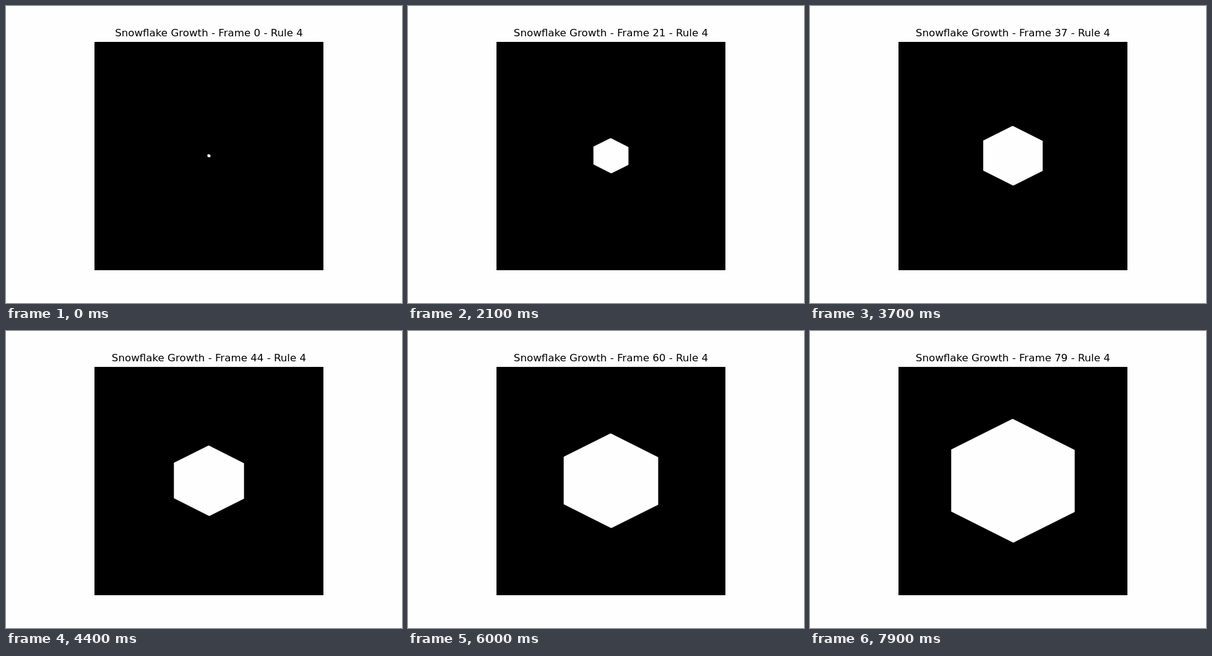
These frames come from a looping animation (640 px wide and 480 px high, 8 s). An HTML page with a canvas:

```html
<!DOCTYPE html>
<html lang="en">
<head>
<meta charset="utf-8">
<title>Snowflake Growth</title>
<style>
  html, body { margin: 0; width: 100%; height: 100%; overflow: hidden; background: #fefefe; }
  canvas { display: block; }
</style>
</head>
<body>
<canvas id="stage" width="640" height="480"></canvas>
<script>
const ctx = document.getElementById('stage').getContext('2d');
const STEP_MS = 100, STEPS = 80;
const CELL = 1.232;          // pixels per grid cell
const CX = 328, CY = 242;

// The flake is point-symmetric, with its tips one cell wide.
function flake(r) {
  const half = [
    [-r, r / 2 - 0.1],
    [-r, -r / 2 - 0.6],
    [-1.2, -r],
    [0.2, -r]
  ];
  const points = [...half, ...half.map(([x, y]) => [-x, -y])];
  ctx.beginPath();
  for (const [x, y] of points) ctx.lineTo(CX + x, CY + y);
  ctx.fill();
}

function draw(step) {
  ctx.fillStyle = '#fefefe';
  ctx.fillRect(0, 0, 640, 480);
  ctx.fillStyle = '#000';
  ctx.fillRect(143, 58, 370, 369);
  ctx.font = '16.667px "DejaVu Sans", sans-serif';
  ctx.textAlign = 'center';
  ctx.fillText(`Snowflake Growth - Frame ${step} - Rule 4`, CX, 49);
  ctx.fillStyle = '#fefefe';
  flake(2.45 + CELL * step);
}

const start = performance.now();
function tick() {
  draw(Math.floor((performance.now() - start) / STEP_MS) % STEPS);
  requestAnimationFrame(tick);
}
tick();
</script>
</body>
</html>
```
